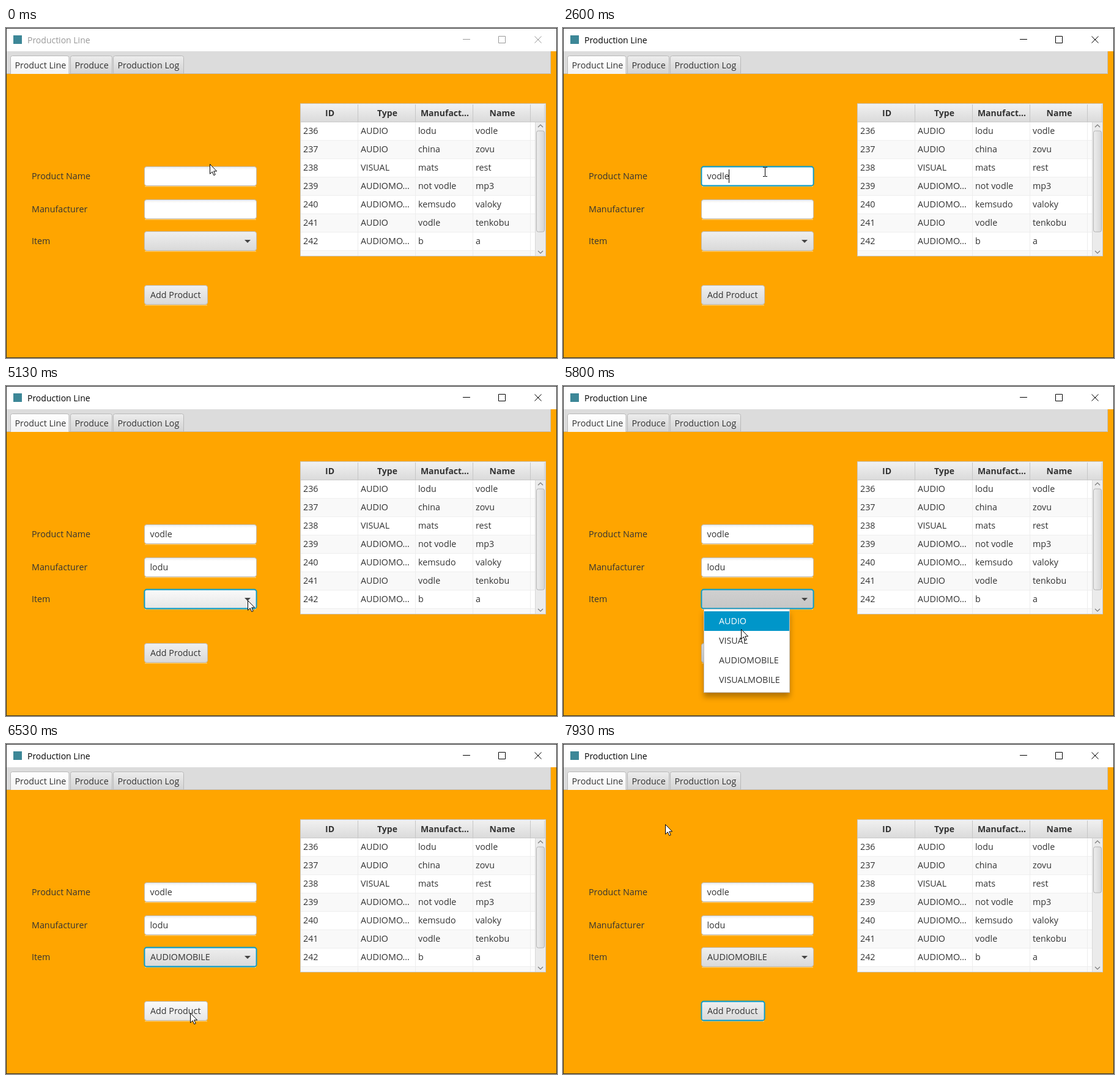
Animation of 901 by 539 pixels, one loop 8000 ms. Source, as an HTML page:

```html
<!DOCTYPE html>
<html lang="en">
<head>
<meta charset="utf-8">
<title>Production Line</title>
<style>
  html, body { margin: 0; width: 100%; height: 100%; overflow: hidden; background: #ffa500; }
  svg { display: block; width: 901px; height: 539px; }
  text { font: 14.3px "Open Sans", "Noto Sans", sans-serif; fill: #333; white-space: pre; }
  .title { font-size: 14px; fill: #000; }
  .head { font-size: 14px; font-weight: 700; text-anchor: middle; }
  .chrome { fill: none; stroke: #000; }
  .idle .title { fill: #999; }
  .idle .chrome { stroke: #999; }
  .rim { stroke: #bebebe; }
  .halo { fill: none; stroke: #039ed3; stroke-opacity: .3; visibility: hidden; }
  .focus .rim { stroke: #0a9bc8; stroke-width: 1.8; }
  .focus .halo { visibility: visible; }
  .hover .rim { fill: url(#hover); }
  .armed .rim { fill: url(#armed); }
  .popup { filter: drop-shadow(0 7px 5px rgba(0, 0, 0, .3)); }
</style>
</head>
<body>
<svg id="stage" viewBox="0 0 901 539" xmlns="http://www.w3.org/2000/svg"></svg>
<script>
const LOOP = 8000, TICK = 1000 / 15;
const stage = document.getElementById('stage');

function el(name, attrs = {}, parent = stage) {
  const node = document.createElementNS('http://www.w3.org/2000/svg', name);
  for (const key in attrs) node.setAttribute(key, attrs[key]);
  parent.append(node);
  return node;
}
const rect = (x, y, width, height, fill, parent, more) =>
  el('rect', { x, y, width, height, fill, ...more }, parent);
const path = (d, attrs, parent) => el('path', { d, ...attrs }, parent);
function label(x, y, content, parent, cls = '') {
  const node = el('text', { x, y, class: cls }, parent);
  node.textContent = content;
  return node;
}
function gradient(id, colors, horizontal) {
  const g = el('linearGradient', { id, x2: horizontal ? 1 : 0, y2: horizontal ? 0 : 1 });
  colors.forEach((color, i) =>
    el('stop', { offset: i / (colors.length - 1), 'stop-color': color }, g));
}
gradient('button', ['#efefef', '#d9d9d9']);
gradient('hover', ['#fafafa', '#e6e6e6']);
gradient('armed', ['#d0d0d0', '#c6c6c6']);
gradient('field', ['#ececec', '#fff', '#fff', '#fff', '#fff', '#fff', '#fff']);
gradient('header', ['#f1f1f1', '#dadada']);
gradient('tab', ['#ededed', '#d3d3d3']);
gradient('tabOn', ['#ffffff', '#f3f3f3']);
gradient('thumb', ['#eeeeee', '#d6d6d6'], true);

function control(x, y, w, h, fill) {
  const g = el('g');
  rect(x + 1, y + h, w - 2, 1.5, '#fff', g, { 'fill-opacity': .4 });
  rect(x - .5, y - .5, w + 1, h + 1, 'none', g, { rx: 4.5, class: 'halo' });
  rect(x + .5, y + .5, w - 1, h - 1, `url(#${fill})`, g, { rx: 3.5, class: 'rim' });
  return g;
}

// Window frame and tabs
rect(0, 0, 901, 539, '#ffa500');
const bar = el('g');
rect(0, 0, 901, 38, '#fff', bar);
rect(12, 12, 14, 14, '#3d8797', bar);
label(35, 25, 'Production Line', bar, 'title');
path('M747 18.5h12M805.5 13.5h11v11h-11zM864.5 13.5l11 11m0-11l-11 11', { class: 'chrome' }, bar);
rect(1, 38, 890, 37, '#dcdcdc');
path('M1 74.5H890.5V38', { fill: 'none', stroke: '#bebebe' });
[[7.5, 95.5, 'Product Line'], [105.5, 68, 'Produce'], [175.5, 115, 'Production Log']]
  .forEach(([x, w, name], i) => {
    path(`M${x} 75V48.5q0-3 3-3h${w - 6}q3 0 3 3V75`,
      { fill: i ? 'url(#tab)' : 'url(#tabOn)', stroke: '#b8b8b8' });
    if (i) rect(x, 74, w, 1, '#bebebe');
    label(x + 7, 66, name);
  });

// Form
label(42, 247, 'Product Name');
label(42, 301, 'Manufacturer');
label(42, 353, 'Item');
function textField(y) {
  const box = control(226, y, 184, 32, 'field');
  return { box, text: label(235.5, y + 21, '', box), caret: rect(0, y + 5, 1, 22, '#000', box) };
}
const nameField = textField(226), makerField = textField(280);
const combo = control(226, 332, 184, 32, 'button');
path('M390 346h10l-5 5z', { fill: '#444' }, combo);
const comboText = label(236, 353, '', combo);
const button = control(226, 420, 104, 32, 'button');
label(236, 441, 'Add Product', button);

// Table
const rows = [
  ['AUDIO', 'lodu', 'vodle'], ['AUDIO', 'china', 'zovu'], ['VISUAL', 'mats', 'rest'],
  ['AUDIOMO...', 'not vodle', 'mp3'], ['AUDIOMO...', 'kemsudo', 'valoky'],
  ['AUDIO', 'vodle', 'tenkobu'], ['AUDIOMO...', 'b', 'a']
];
rect(481, 123, 402, 250, '#fff');
for (let i = 1; i < 8; i += 2) rect(482, 154 + i * 30, 384, i < 7 ? 30 : 8, '#f9f9f9');
for (let i = 1; i < 8; i++) rect(482, 153 + i * 30, 384, 1, '#efefef');
for (let i = 1; i < 5; i++) rect(481 + i * 94, 154, 1, 218, '#ededed');
rows.forEach((row, i) => [236 + i, ...row].forEach((cell, c) =>
  label(486 + c * 94, 173 + i * 30, cell)));
rect(482, 124, 400, 30, 'url(#header)');
rect(482, 153, 400, 1, '#c9c9c9');
['ID', 'Type', 'Manufact...', 'Name'].forEach((name, i) => {
  label(529.5 + i * 94, 144, name, stage, 'head');
  rect(575 + i * 94, 125, 1, 28, '#c6c6c6');
});
rect(880, 125, 1, 28, '#d0d0d0');
rect(865, 154, 17, 218, '#ebebeb');
rect(865, 154, 1, 218, '#d8d8d8');
path('M870 162l4-4 4 4M870 364l4 4 4-4', { fill: 'none', stroke: '#777', 'stroke-width': 1.2 });
const thumb = rect(867.5, 168, 13, 165, 'url(#thumb)', stage, { rx: 3, stroke: '#b4b4b4' });
rect(481.5, 123.5, 401, 249, 'none', stage, { stroke: '#c8c8c8' });

// Drop-down list
const popup = el('g', { class: 'popup' });
rect(230.5, 364.5, 140, 136, '#fff', popup, { stroke: '#c4c4c4' });
const mark = rect(231, 368, 139, 32, '#0096c9', popup);
const items = ['AUDIO', 'VISUAL', 'AUDIOMOBILE', 'VISUALMOBILE']
  .map((name, i) => label(255, 389 + i * 32, name, popup));

rect(.5, .5, 900, 538, 'none', stage, { stroke: '#303030' });

// Pointers, with the hot spot at 0,0
const arrow = path('M.5 .5V16.3L4.2 12.8 6.8 18.6 9.2 17.6 6.7 11.9H11.6Z',
  { fill: '#fff', stroke: '#000', 'stroke-linejoin': 'round' });
const beam = path('M-3 -7.5h2.5q1 0 1 1q0-1 1-1H4M.5 -7V7M-3 7.5h2.5q1 0 1-1q0 1 1 1H4',
  { fill: 'none', stroke: '#000' });

// Timed states: [start, value]
const typedName = [[0, ''], [1000, 'v'], [1330, 'vo'], [1530, 'vod'], [1730, 'vodl'],
  [1870, 'vodle'], [2070, 'vodled'], [2530, 'vodle']];
const typedMaker = [[0, ''], [3470, 'l'], [3670, 'lo'], [3800, 'lod'], [4000, 'lodu']];
const focused = [[0, null], [200, nameField.box], [2930, makerField.box], [5130, combo], [7070, button]];
const caretOn = [[0, true], [670, false], [1000, true], [4530, false], [5000, true]];
const route = [
  [0, 333, 222], [70, 332, 228], [200, 330, 233], [530, 331, 236], [670, 330, 235],
  [4530, 330, 235], [4800, 350, 285], [5130, 395, 350], [5330, 397, 361], [5530, 288, 374],
  [5670, 288, 374], [5800, 291, 396], [5930, 295, 425], [6070, 301, 457], [6200, 301, 439],
  [6530, 301, 439], [6930, 300, 432], [7600, 300, 432], [7670, 288, 404], [7930, 167, 131]
];

const at = (steps, t) => steps.findLast(step => step[0] <= t)[1];
const show = (node, on) => node.setAttribute('visibility', on ? 'inherit' : 'hidden');
const inside = (x, y, top, right) => x > 226 && x < right && y > top && y < top + 32;

function pointer(t) {
  const i = route.findIndex(p => p[0] > t);
  if (i < 0) return route.at(-1).slice(1);
  const [a, b] = [route[i - 1], route[i]];
  const k = (t - a[0]) / (b[0] - a[0]);
  return [1, 2].map(n => Math.round(a[n] + (b[n] - a[n]) * k));
}

function fillField(field, value, active, caret) {
  if (field.text.textContent !== value) field.text.textContent = value;
  field.caret.setAttribute('x', Math.round(235 + field.text.getComputedTextLength()));
  show(field.caret, active && caret);
}

function draw(t) {
  const focus = at(focused, t), caret = at(caretOn, t);
  const [x, y] = pointer(t);
  const open = t >= 5200 && t < 6530;

  bar.classList.toggle('idle', t < 200);
  for (const box of [nameField.box, makerField.box, combo, button])
    box.classList.toggle('focus', box === focus);
  fillField(nameField, at(typedName, t), focus === nameField.box, caret);
  fillField(makerField, at(typedMaker, t), focus === makerField.box, caret);

  combo.classList.toggle('armed', open);
  combo.classList.toggle('hover', !open && inside(x, y, 332, 410));
  comboText.textContent = t >= 6530 ? 'AUDIOMOBILE' : '';
  show(popup, open);
  const row = t >= 5730 ? Math.floor((y - 368) / 32) : -1;
  show(mark, row >= 0);
  mark.setAttribute('y', 368 + row * 32);
  items.forEach((item, i) => item.style.fill = i === row ? '#fff' : '');

  button.classList.toggle('hover', !open && inside(x, y, 420, 330));
  button.classList.toggle('armed', t >= 7070 && t < 7200);
  thumb.setAttribute('height', t >= 7270 ? 75 : 165);

  const overField = inside(x, y, 226, 410) || inside(x, y, 280, 410);
  show(arrow, !overField);
  show(beam, overField);
  for (const shape of [arrow, beam]) shape.setAttribute('transform', `translate(${x} ${y})`);
}

function frame() {
  const t = performance.now() % LOOP;
  draw(Math.floor((t + 5) / TICK) * TICK + 5);
  requestAnimationFrame(frame);
}
frame();
</script>
</body>
</html>
```
